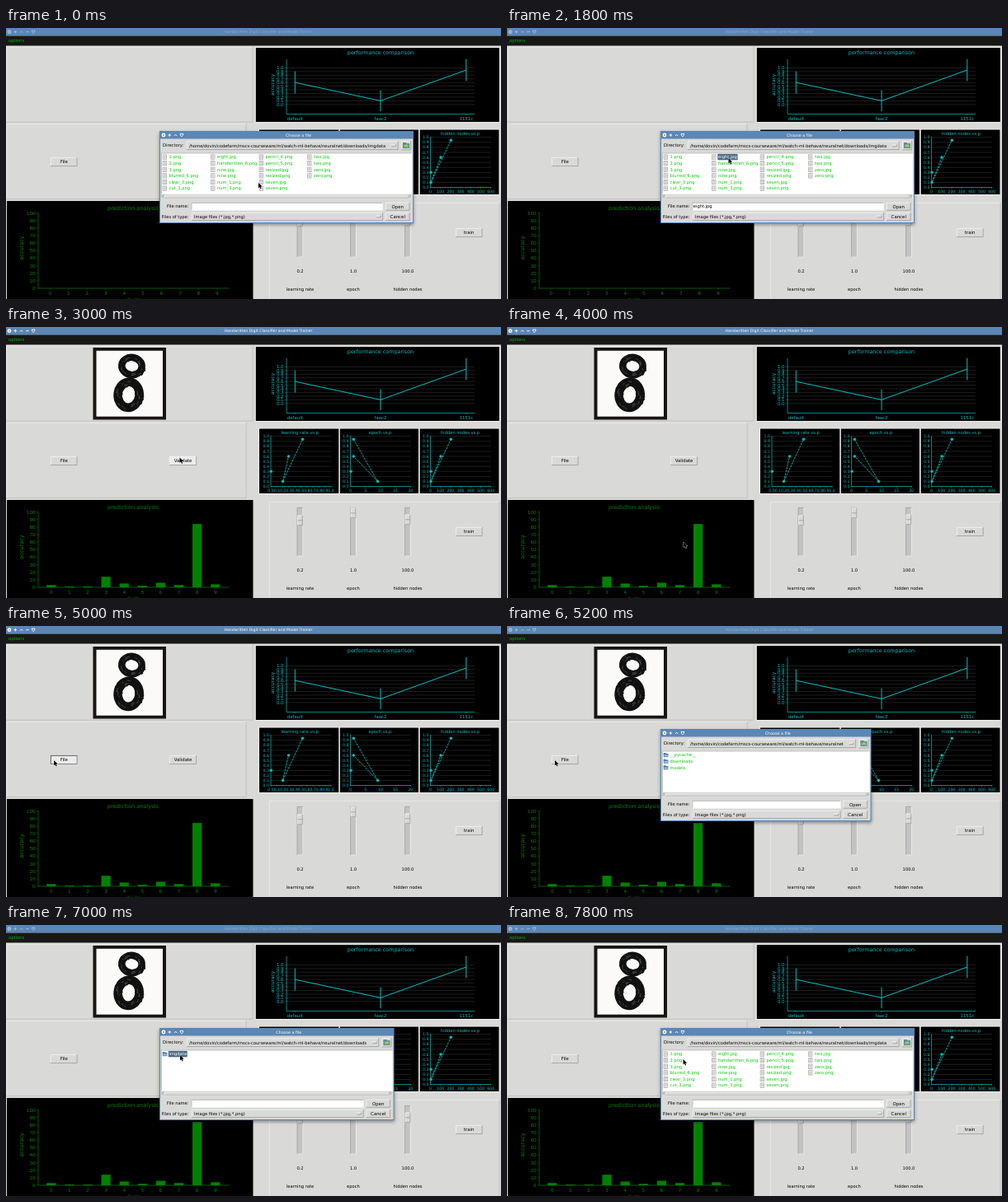
These frames come from a looping animation (600x329 px, 8000 ms). An HTML page with a canvas:

```html
<!DOCTYPE html>
<html lang="en">
<head>
<meta charset="utf-8">
<title>Digit classifier demo</title>
<style>
html, body { margin: 0; width: 100%; height: 100%; overflow: hidden; background: #d9d9d7; }
canvas { display: block; width: 600px; height: 329px; }
</style>
</head>
<body>
<canvas id="stage" width="600" height="329"></canvas>
<script>
const ctx = document.getElementById('stage').getContext('2d');
const LOOP = 8000, STEP = 200;
const GRAY = '#d9d9d7', BLUE = '#5a87b5', TEAL = '#00bfbf', GREEN = '#008000', LIME = '#00cd00';
const ROOT = '/home/dovin/codefarm/mscs-courseware/ml/watch-ml-behave/neuralnet';

// [time, x, y] of the pointer tip
const POINTER = [
  [0, 306, 188], [200, 306, 187], [400, 306, 187.6], [600, 306, 187.6], [800, 306, 187.9], [1000, 306, 187.9],
  [1600, 269, 159], [1800, 268.5, 158], [2000, 269, 157.5], [2200, 253, 158], [2800, 211, 159], [3000, 210.5, 158.5],
  [3400, 210.5, 158.5], [3600, 212, 200], [4000, 214, 261], [4200, 185, 236], [4600, 79, 173],
  [4800, 62, 165], [5000, 58, 163], [5200, 58, 163], [5800, 236, 155], [6000, 243, 156],
  [6400, 215, 165], [6600, 214, 164], [7000, 211, 158], [7200, 211, 158], [7800, 213.5, 163]
];

const FILES = [
  '1.png 2.png 3.png blurred_6.png clear_3.png cut_3.png',
  'eight.jpg handwritten_6.png nine.jpg nine.png num_1.png num_3.png',
  'pencil_4.png pencil_5.png resized.jpg resized.png seven.jpg seven.png',
  'two.jpg two.png zero.jpg zero.png'
].map(column => column.split(' '));

const SCORES = [3, 1, 1, 14, 5, 2, 6, 3, 84, 4];
const RUNS = [0.6, 0.1, 0.94];

function rect(x, y, right, bottom, color) {
  ctx.fillStyle = color;
  ctx.fillRect(x, y, right - x, bottom - y);
}

function line(points, color, width = 0.6, dash = []) {
  ctx.beginPath();
  points.forEach(([x, y]) => ctx.lineTo(x, y));
  ctx.strokeStyle = color;
  ctx.lineWidth = width;
  ctx.setLineDash(dash);
  ctx.stroke();
  ctx.setLineDash([]);
}

function dot(x, y, radius, color) {
  ctx.beginPath();
  ctx.arc(x, y, radius, 0, 7);
  ctx.fillStyle = color;
  ctx.fill();
}

function text(string, x, y, color = '#000', size = 5.15, align = 'left') {
  ctx.font = `${size}px "DejaVu Sans", sans-serif`;
  ctx.textAlign = align;
  ctx.textBaseline = 'alphabetic';
  ctx.fillStyle = color;
  ctx.fillText(string, x, y + size * 0.36);
}

function verticalText(string, x, y, color, size) {
  ctx.save();
  ctx.translate(x, y);
  ctx.rotate(-Math.PI / 2);
  text(string, 0, 0, color, size, 'center');
  ctx.restore();
}

function bevel(x, y, right, bottom, { fill = GRAY, light = '#f4f4f2', dark = '#9a9a98', sunken = false } = {}) {
  const [upper, lower] = sunken ? [dark, light] : [light, dark];
  rect(x, y, right, bottom, fill);
  line([[x + .4, bottom], [x + .4, y + .4], [right, y + .4]], upper, .8);
  line([[x, bottom - .4], [right - .4, bottom - .4], [right - .4, y]], lower, .8);
}

function panel(x, y, right, bottom) {
  bevel(x, y, right, bottom, { light: '#ebebe9', dark: '#bababa' });
}

function plot(x, y, right, bottom) {
  rect(x - .8, y - .8, right + .8, bottom + .8, '#f4f4f2');
  rect(x, y, right, bottom, '#000');
}

function button(label, x, y, right, bottom, state = '') {
  bevel(x, y, right, bottom, { fill: state ? '#ececec' : GRAY, sunken: state === 'pressed' });
  if (state === 'pressed') {
    ctx.strokeStyle = '#555';
    ctx.lineWidth = .7;
    ctx.strokeRect(x + .4, y + .4, right - x - .8, bottom - y - .8);
  }
  text(label, (x + right) / 2, (y + bottom) / 2, '#000', 5.4, 'center');
}

function windowIcons(glyphs, x, y, color) {
  for (const glyph of glyphs) {
    if (glyph === 'x') {
      dot(x, y, 2.4, color);
      line([[x - 1, y - 1], [x + 1, y + 1]], BLUE, .7);
      line([[x + 1, y - 1], [x - 1, y + 1]], BLUE, .7);
    }
    if (glyph === '+') line([[x, y - 1.8], [x, y + 1.8]], color, .9);
    if (glyph === '+' || glyph === '-') line([[x - 1.8, y], [x + 1.8, y]], color, .9);
    if (glyph === '^') line([[x - 1.7, y + 1], [x, y - .8], [x + 1.7, y + 1]], color, .9);
    if (glyph === 'v') line([[x - 1.8, y - 1.6], [x + 1.8, y - 1.6], [x + 1.4, y + .5], [x, y + 1.8], [x - 1.4, y + .5], [x - 1.8, y - 1.6]], color, .9);
    x += 7.3;
  }
}

function axes(left, top, right, bottom, color) {
  line([[left, top], [left, bottom], [right, bottom]], color, .7);
}

function comparisonChart() {
  plot(302.8, 24, 598, 114);
  text('performance comparison', 454, 29.5, TEAL, 6.4, 'center');
  const yOf = value => 92.8 - value * 44.4;
  for (let i = 0; i <= 10; i++) {
    const y = yOf(i / 10);
    line([[340, y], [568, y]], '#3a3a3a', .5);
    line([[338.5, y], [340, y]], TEAL, .5);
    text((i / 10).toFixed(1), 336.5, y, TEAL, 5.4, 'right');
  }
  axes(340, 38, 568, 104.5, TEAL);
  verticalText('accuracy', 323, 69, TEAL, 5.8);
  const xs = [350.3, 454, 557.8], spread = [13.5, 12.7, 13.3];
  line(xs.map((x, i) => [x, yOf(RUNS[i])]), TEAL, 1);
  xs.forEach((x, i) => {
    const y = yOf(RUNS[i]);
    line([[x, y - spread[i]], [x, y + spread[i]]], TEAL, 1);
    line([[x, 104.5], [x, 106]], TEAL, .5);
    text(['default', 'faac2', '1151c'][i], x, 110.5, TEAL, 5.4, 'center');
  });
}

function parameterChart(left, right, title, axis, labels, gap, xs, extra) {
  plot(left, 123.5, right, 202);
  text(title, (left + right) / 2 + 1, 128, TEAL, 5.15, 'center');
  const yOf = value => 193.6 - value * 61;
  for (let i = 0; i <= 10; i++) {
    const y = yOf(i / 10);
    line([[axis, y], [axis + 73.5, y]], '#3a3a3a', .5);
    text((i / 10).toFixed(1), axis - 2, y, TEAL, 4.7, 'right');
  }
  axes(axis, 132, axis + 73.5, 193.6, TEAL);
  labels.forEach((label, i) => {
    line([[axis + i * gap, 193.6], [axis + i * gap, 194.8]], TEAL, .5);
    text(label, axis + i * gap, 198, TEAL, 4.6, 'center');
  });
  const points = xs.map((x, i) => [x, yOf(RUNS[i])]);
  line(points, TEAL, .9, [2.6, 1.1]);
  [...points, [extra, yOf(.3)]].forEach(([x, y]) => dot(x, y, 1.7, TEAL));
}

function predictionChart(validated) {
  rect(1, 210, 299.5, 329, '#000');
  text('prediction analysis', 154, 218.5, GREEN, 6.6, 'center');
  verticalText('accuracy', 18.5, 267, GREEN, 6.5);
  const yOf = value => 316 - value * .915;
  for (let value = 0; value <= 100; value += 10) {
    line([[37.3, yOf(value)], [39, yOf(value)]], GREEN, .5);
    text(value, 35.5, yOf(value), GREEN, 5.6, 'right');
  }
  axes(39, 224, 270, 316, GREEN);
  const first = validated ? 54.8 : 53.3, gap = validated ? 22.1 : 22.5;
  SCORES.forEach((score, i) => {
    const x = first + i * gap;
    line([[x, 316], [x, 317.6]], GREEN, .5);
    text(i, x, 322, GREEN, 5.6, 'center');
    if (validated) rect(x - 5.6, yOf(score), x + 5.6, 316, GREEN);
  });
  text('digits', 154, 330, GREEN, 6, 'center');
}

function slider(x, offset, value, label) {
  bevel(x - 3.8, 219, x + 3.8, 278.5, { fill: '#c3c3c3', dark: '#a2a2a0', sunken: true });
  const top = 219.6 + offset;
  bevel(x - 3.2, top, x + 3.2, top + 12.5);
  line([[x - 3, top + 6.2], [x + 3, top + 6.2]], '#909090', .7);
  text(value, x, 295.3, '#000', 5.2, 'center');
  text(label, x, 317, '#000', 5.2, 'center');
}

// A brushed figure eight: two thick rings with ragged edges and a few dry streaks.
function paintedEight() {
  rect(105.5, 25, 194, 112.5, '#171412');
  rect(109.5, 28.8, 190, 108.7, '#fbfaf8');
  let seed = 7;
  const random = () => (seed = seed * 16807 % 2147483647) / 2147483647;
  const ring = (x, y, rx, ry, width) => {
    ctx.beginPath();
    ctx.ellipse(x, y, rx, ry, .12, 0, Math.PI * 2);
    ctx.lineWidth = width;
    ctx.stroke();
  };
  const brush = (color, shift, upper, lower) => {
    const dx = (random() - .5) * shift, dy = (random() - .5) * shift;
    ctx.strokeStyle = color;
    ring(152.5 + dx, 47.5 + dy, 12.2, 10.6, upper);
    ring(148.6 + dx, 82.3 + dy, 13, 15.6, lower);
  };
  brush('#111', 0, 8.5, 10.5);
  for (let i = 0; i < 18; i++) {
    const dry = i > 9;
    ctx.setLineDash([1 + random() * 5, 15 + random() * 40]);
    ctx.lineDashOffset = random() * 90;
    if (dry) brush('rgba(255,255,255,.55)', 8, .45, .45);
    else brush('#111', 3, 7.5, 9.5);
  }
  ctx.setLineDash([]);
}

function mainWindow(scene, buttonState) {
  const active = !scene.folder;
  rect(0, 0, 600, 329, GRAY);
  rect(0, 0, 600, 9.5, BLUE);
  windowIcons('x+^-v', 4, 4.7, active ? '#fff' : '#a9c0d8');
  text('Handwritten Digit Classifier and Model Trainer', 318, 4.8, active ? '#fff' : '#8ba9c8', 4.67, 'center');
  rect(0, 9.5, 600, 21.5, '#181817');
  text('options', 3, 15.3, '#00b400', 5.2);

  panel(.5, 22.8, 299.5, 114.5);
  panel(.5, 116, 291.5, 208);
  panel(319, 212, 598.5, 332);
  if (scene.loaded) paintedEight();
  button('File', 54, 157, 86.5, 168, buttonState(54, 86.5));
  button('Validate', 198, 157, 231, 168, buttonState(198, 231));

  comparisonChart();
  const tenths = Array.from({ length: 11 }, (_, i) => (i / 10).toFixed(1));
  parameterChart(307, 403.3, 'learning rate vs.p', 321, tenths, 7.3, [342.5, 335.5, 359.5], 321.3);
  parameterChart(404.8, 500, 'epoch vs.p', 417.5, [0, 5, 10, 15, 20], 18.2, [421.3, 450.5, 421.3], 418);
  parameterChart(501.6, 597.5, 'hidden nodes vs.p', 514.5, [0, 100, 200, 300, 400, 500, 600], 12.2, [527, 515, 539.3], 515);
  predictionChart(scene.validated);

  slider(356.5, 9, '0.2', 'learning rate');
  slider(421, 0, '1.0', 'epoch');
  slider(487, 8, '100.0', 'hidden nodes');
  button('train', 545, 243, 577.5, 254);
}

function menuButton(label, x, y, right, bottom) {
  bevel(x, y, right, bottom);
  const middle = (y + bottom) / 2;
  text(label, x + 3, middle);
  bevel(right - 8.5, middle - 1.4, right - 2.5, middle + 1.4);
}

function folderIcon(x, y) {
  rect(x, y - 2.6, x + 2.6, y, '#4f81ad');
  rect(x, y - 1.8, x + 5.6, y + 2.6, '#4f81ad');
  rect(x + .7, y - .2, x + 5, y + 1.8, '#9cc3e2');
}

function upButton(right) {
  bevel(right - 15, 137, right - 3, 148.3);
  rect(right - 13, 139.2, right - 9, 142, '#4f81ad');
  rect(right - 13, 140.2, right - 5, 146, '#4f81ad');
  rect(right - 12, 141.4, right - 5.8, 145.2, '#7fb95c');
  line([[right - 10.2, 143.4], [right - 8.9, 141.8], [right - 7.6, 143.4]], '#e4e870', .8);
}

function pageIcon(x, y) {
  rect(x, y - 3, x + 5, y + 3, '#8e8e8e');
  rect(x + .5, y - 2.5, x + 4.5, y + 2.5, '#f2f2f2');
  for (let row = -1.5; row < 2; row += 1.4) line([[x + 1.1, y + row], [x + 3.9, y + row]], '#9a9a9a', .5);
}

function fileList(columns, icon, selected) {
  columns.forEach((names, column) => names.forEach((name, row) => {
    const x = 189.8 + column * 58.5, y = 156.6 + row * 7.6;
    icon(x, y);
    const chosen = name === selected;
    if (chosen) {
      ctx.font = '5.15px "DejaVu Sans", sans-serif';
      rect(x + 7, y - 3.7, x + 8.6 + ctx.measureText(name).width, y + 3.7, '#4a6984');
    }
    text(name, x + 7.8, y, chosen ? '#fff' : LIME);
  }));
}

function scrollbar(right) {
  bevel(188, 202.3, right - 2, 207.3, { fill: '#cfcfcd', light: '#e6e6e4', dark: '#bdbdbb', sunken: true });
  bevel(192, 202.8, right - 6, 206.8, { dark: '#bdbdbb' });
  line([[191.2, 203.3], [189.3, 204.8], [191.2, 206.3]], '#999', .6);
  line([[right - 5.2, 203.3], [right - 3.3, 204.8], [right - 5.2, 206.3]], '#999', .6);
}

function dialog({ folder, selected }) {
  const right = { neuralnet: 441.5, downloads: 470.5, imgdata: 494 }[folder];
  const path = { neuralnet: '', downloads: '/downloads', imgdata: '/downloads/imgdata' }[folder];
  ctx.save();
  ctx.shadowColor = 'rgba(0,0,0,.4)';
  ctx.shadowBlur = 4;
  ctx.shadowOffsetY = 1.5;
  rect(186, 125, right, 237, BLUE);
  ctx.restore();
  rect(187, 134.5, right - 1, 236, GRAY);
  windowIcons('x+^v', 191, 130, '#fff');
  text('Choose a file', (186 + right) / 2 + 14.5, 130, '#fff', 4.8, 'center');

  text('Directory:', 190, 142.6);
  menuButton(ROOT + path, 219, 137.5, right - 18.5, 148);
  upButton(right);

  const field = { fill: '#fff', dark: '#a8a8a6', sunken: true };
  bevel(188, 151.5, right - 2, 202, field);
  if (folder === 'imgdata') fileList(FILES, pageIcon, selected);
  else fileList([folder === 'downloads' ? ['imgdata'] : ['__pycache__', 'downloads', 'models']], folderIcon, selected);
  scrollbar(right);

  text('File name:', 221.5, 216.6, '#000', 5.15, 'right');
  bevel(224.5, 212, right - 37, 221.5, field);
  if (folder === 'imgdata' && selected) text(selected, 225.8, 216.6);
  text('Files of type:', 221.5, 229, '#000', 5.15, 'right');
  menuButton('Image files (*.jpg,*.png)', 225, 224, right - 37, 234);
  button('Open', right - 34, 211.8, right - 4.5, 221.6);
  button('Cancel', right - 34, 224, right - 4.5, 234);
}

function pointerAt(time) {
  const next = POINTER.findIndex(([t]) => t > time);
  if (next < 0) return POINTER[POINTER.length - 1].slice(1);
  const [t0, x0, y0] = POINTER[next - 1], [t1, x1, y1] = POINTER[next];
  const k = (time - t0) / (t1 - t0);
  return [x0 + (x1 - x0) * k, y0 + (y1 - y0) * k];
}

function pointer(x, y) {
  ctx.save();
  ctx.translate(x, y);
  const arrow = new Path2D('M0 0 L0 6.4 L1.5 5.1 L2.6 7.6 L3.7 7.1 L2.6 4.7 L4.6 4.6 Z');
  ctx.strokeStyle = 'rgba(255,255,255,.8)';
  ctx.lineWidth = .9;
  ctx.stroke(arrow);
  ctx.fillStyle = '#000';
  ctx.fill(arrow);
  ctx.restore();
}

function sceneAt(time) {
  const scene = { loaded: time >= 2200, validated: time >= 3000, folder: '', selected: '' };
  if (time < 2000 || time >= 7200) scene.folder = 'imgdata';
  else if (time >= 6600) scene.folder = 'downloads';
  else if (time >= 5200) scene.folder = 'neuralnet';
  if (time === 1800) scene.selected = 'eight.jpg';
  if (time === 6400) scene.selected = 'downloads';
  if (time === 7000) scene.selected = 'imgdata';
  return scene;
}

function draw(now) {
  const time = Math.floor(now % LOOP / STEP) * STEP;
  const scene = sceneAt(time), [x, y] = pointerAt(time);
  const buttonState = (left, right) => {
    if (scene.folder || x < left || x > right || y < 157 || y > 168) return '';
    return time === 5000 ? 'pressed' : 'hover';
  };
  ctx.textRendering = 'geometricPrecision';
  mainWindow(scene, buttonState);
  if (scene.folder) dialog(scene);
  pointer(x, y);
}

let start;
function tick(now) {
  start ??= now;
  draw(now - start);
  requestAnimationFrame(tick);
}
requestAnimationFrame(tick);
</script>
</body>
</html>
```
